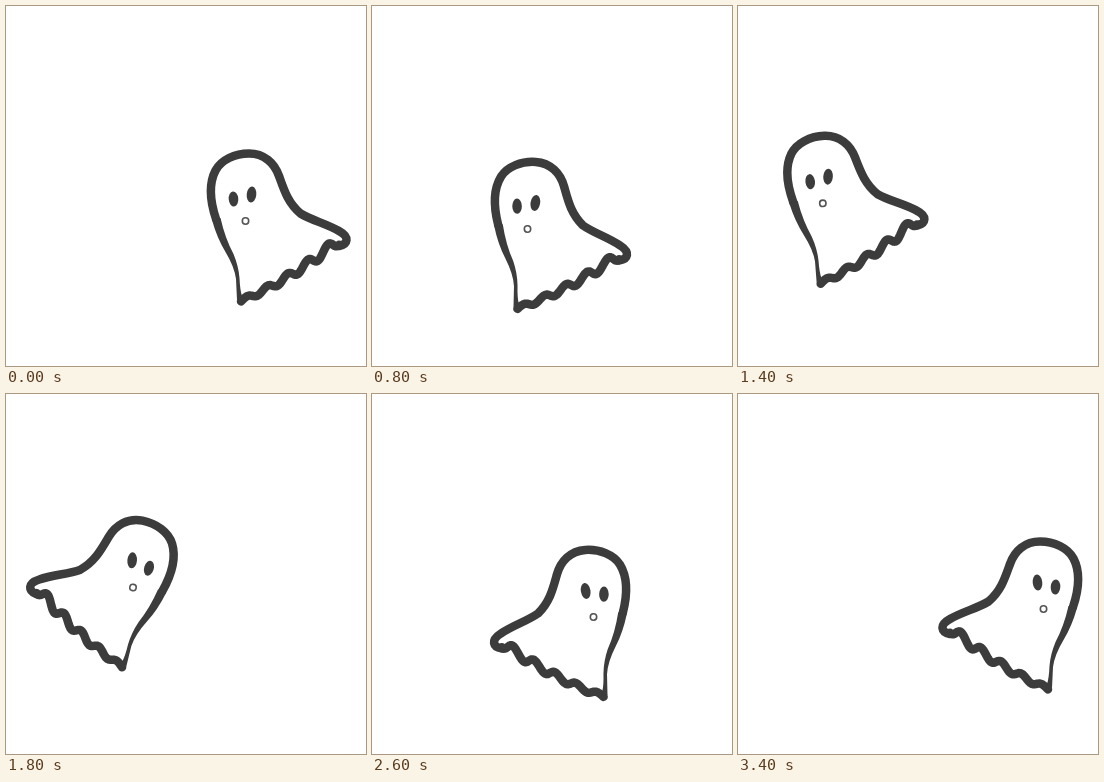
These frames come from a looping animation (360 by 360 pixels, 3.8 s). An HTML page:

```html
<!DOCTYPE html>
<html lang="en">
<head>
<meta charset="utf-8">
<title>Floating ghost</title>
<style>
  html, body { margin: 0; width: 100%; height: 100%; overflow: hidden; background: #fff; }
  svg { display: block; width: 100vw; height: 100vh; }
</style>
</head>
<body>
<svg viewBox="0 0 360 360">
  <g id="ghost" fill="#3c3c3d">
    <g fill="none" stroke="#3c3c3d" stroke-width="8.5" stroke-linecap="round" stroke-linejoin="round">
      <path d="M210 213 C204 195 203 177 209.500 164.500 C215 154 229 147.500 243 147.500
               C258 147.500 268.500 157 273 170 C278 184 282 197 294.500 207.500
               C306 214.500 320 217.500 333 225 C344 231 342 238 333 240"/>
      <polyline id="hem"/>
    </g>
    <path d="M206 214 Q211 232 219.500 246 Q228.500 261 230 273 L231 294 L236 290
             Q234 284 233.500 272 Q232.500 260 227.500 248 Q219 232 214.500 212Z"/>
    <ellipse cx="227.500" cy="193" rx="4.800" ry="7.600" transform="rotate(-5 227.500 193)"/>
    <ellipse cx="245.500" cy="188.500" rx="4.800" ry="8" transform="rotate(6 245.500 188.500)"/>
    <circle cx="239.500" cy="215" r="3.200" fill="none" stroke="#555" stroke-width="1.600"/>
  </g>
</svg>
<script>
const STEP = 200, LOOP = 3800, LAST = 17, TURN = 8;

// Key poses of the flight to the left: step, mouth x, mouth y, tilt
const keys = [
  [0, 239.5, 215, 0],
  [2, 195, 188, -13],
  [4, 155.5, 223, 4],
  [5, 121.5, 222, 17],
  [8, 66.5, 193.5, -11]
];

const mix = (a, b, t) => a + (b - a) * t;

function poseAt(step) {
  const next = Math.max(1, keys.findIndex(key => key[0] >= step));
  const [from, x0, y0, tilt0] = keys[next - 1];
  const [to, x1, y1, tilt1] = keys[next];
  const t = (step - from) / (to - from);
  return { x: mix(x0, x1, t), y: mix(y0, y1, Math.sin(t * Math.PI / 2)), tilt: mix(tilt0, tilt1, t) };
}

// Scallops along a gently bent line, flattening towards the narrow end
function hemPoints() {
  const points = [];
  for (let x = 333; x >= 235; x--) {
    const run = 322 - x;
    const depth = 4.7 * (1 - run / 140);
    const y = 242.8 + 0.78 * run - 0.0021 * run * run - depth * Math.cos(run * 2 * Math.PI / 20.2);
    points.push(`${x},${y.toFixed(2)}`);
  }
  return points.join(" ");
}

const ghost = document.getElementById("ghost");
document.getElementById("hem").setAttribute("points", hemPoints());

function draw() {
  const step = Math.min(LAST, Math.floor(performance.now() % LOOP / STEP));
  const returning = step > TURN;
  const { x, y, tilt } = poseAt(returning ? LAST - step : step);
  // The way back is the same flight, each pose flipped about its own middle
  const shift = returning ? 66 + Math.min(0, tilt) / 2 : 0;
  ghost.setAttribute("transform",
    `translate(${x + shift} ${y}) scale(${returning ? -1 : 1} 1) rotate(${tilt}) translate(-239.5 -215)`);
  requestAnimationFrame(draw);
}
draw();
</script>
</body>
</html>
```
